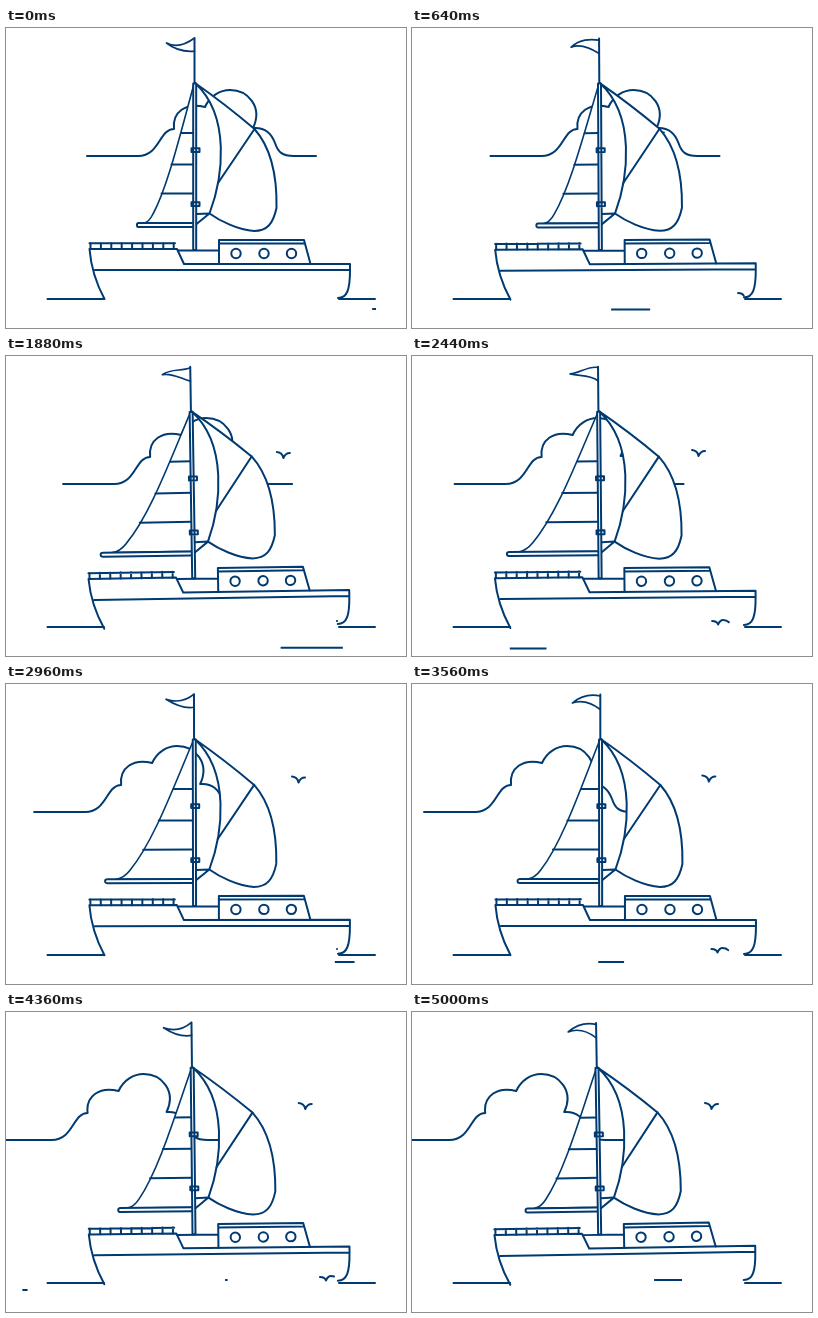
Animation, 400 px wide and 300 px high, one loop 5040 ms. Source, as an HTML page:

```html
<!DOCTYPE html>
<html lang="en">
<head>
<meta charset="utf-8">
<title>Sailing boat</title>
<style>
html, body { margin: 0; width: 100%; height: 100%; overflow: hidden; background: #fff; }
svg { display: block; width: 400px; height: 300px; }
svg * { vector-effect: non-scaling-stroke; }
</style>
</head>
<body>
<svg viewBox="0 0 400 300" fill="none" stroke="#003a70" stroke-width="2" stroke-linejoin="round" stroke-linecap="round">
  <path id="cloud" d="M81 128H132C154 128 153 101 168 101C166 84 180 74 199 79C204 68 214 62 224 62C242 62 257 79 247 100C258 99 265 104 269 115C272 124 276 128 288 128H310"/>
  <path id="gull" d="M-6.5 -3Q-1 -2.500 0 3Q2 -2 6.500 -2"/>
  <path d="M41.500 271H98M333 271H369"/>

  <g id="boat">
    <!-- hull and rail -->
    <path d="M83.500 221H171L178 236H344V242C344 262 341 270 332 270M83.500 221C85 240 91 257 98.500 271M89 242H344"/>
    <path id="rail"/>
    <path d="M172 222.500H213M213 236V212H298L304.500 236M213 215.500H298"/>
    <circle cx="230" cy="225.500" r="4.700"/>
    <circle cx="258" cy="225.500" r="4.700"/>
    <circle cx="285.500" cy="225.500" r="4.700"/>

    <!-- main sail, stretched sideways from the mast -->
    <g id="main" fill="#fff">
      <path stroke-width="1.600" d="M0 56C-13 103 -26 158 -41 186Q-45 194 -50 195H0Z"/>
      <path d="M-13 105H0M-22.500 136.500H0M-32.500 165.500H0"/>
      <rect x="-57" y="195" width="57" height="4" rx="1.500"/>
    </g>

    <!-- headsail -->
    <path fill="#fff" d="M189 55Q219 76 248.500 101C267 122 271 155 270.500 180C267 196 261 203 248 203C232 202 214 193 203.500 185.500C217 150 225 88 189 55Z"/>
    <path d="M248.500 101L212 155M190.500 186L203.500 185.500L190.500 196"/>

    <!-- mast and pennant -->
    <path fill="#fff" d="M187.200 55.500H190.200V222H187.200ZM185.500 120.200H193.500V124H185.500ZM185.500 174.200H193.500V178H185.500Z"/>
    <path d="M188.500 10.500V55"/>
    <path id="flag" stroke-width="1.700"/>
  </g>

  <path id="ripples" stroke-linecap="butt"/>
  <path id="splash" d="M0 265Q5 265 6 268.500Q8 264 11 264Q16 264 18 268"/>
</svg>

<script>
const LOOP = 5040;
const $ = id => document.getElementById(id);
const set = (id, name, value) => $(id).setAttribute(name, value);
const clamp = v => Math.min(1, Math.max(0, v));
const ease = v => (1 - Math.cos(Math.PI * clamp(v))) / 2;
const span = (t, start, length) => ease((t - start) / length);
const wave = turns => Math.cos(2 * Math.PI * turns);

// Ripples run right to left: front start, front time, back start, back time, y, sink
const ripples = [
  [-100, 1550, 150, 1200, 281, 2.5],
  [1285, 1750, 1607, 1410, 291.5, 2],
  [2500, 2120, 2650, 2000, 278, 0]
];
const splashes = [440, 1850, 2960, 3965];

let rail = 'M83.5 215.3H169';
for (let i = 0; i < 9; i++) rail += `M${84.5 + i * 10.4} 215V221`;
set('rail', 'd', rail);

function flagPath(t) {
  const turn = t / 1425;
  const c = wave(turn), near = wave(turn - 0.12), far = wave(turn + 0.08);
  const tip = 17 - 2 * c;
  return `M188.5 ${11 - c}C179 ${13.5 + 5 * near} 170 ${15.5 + 5 * far} 160.5 ${tip}` +
    `C170 ${19 + 4 * far} 179 ${21 + 4 * near} 188.5 ${24.3 - 1.2 * c}`;
}

function ripplePath(t) {
  let d = '';
  for (const [f0, fLen, b0, bLen, base, sink] of ripples) {
    const front = span(t, f0, fLen), back = span(t, b0, bLen);
    if (front <= back) continue;
    const y = base + sink * front * front;
    d += `M${370 - 367 * front} ${y}H${370 - 367 * back}`;
  }
  const u = (t - 4340) / 660;
  if (u > 0) d += `M${219 + 23 * u * u} 268H${220 + 50 * u}`;
  return d;
}

function drawSplash(t) {
  const start = splashes.find(s => t > s && t < s + 900);
  set('splash', 'visibility', start ? 'visible' : 'hidden');
  if (!start) return;
  const u = (t - start) / 900;
  const head = 331 - 42 * ease(u), tail = 331 - 42 * ease(u - 0.25);
  set('splash', 'transform', `translate(${head})`);
  set('splash', 'stroke-dasharray', `${(tail - head) * 1.3} 99`);
}

function draw(t) {
  set('cloud', 'transform', `translate(${-97 * span(t, 80, 5450)})`);

  const left = Math.max(0, 4.9 - t / 1000) ** 2.6 * 1.25;
  set('gull', 'transform', `translate(${299.5 - left} ${94 + 0.23 * left})`);

  set('boat', 'transform', `rotate(${-0.465 * (1 - wave(t / 3333))} 210 285)`);
  const boom = 57 + 36 * span(t, 100, 2000) - 20 * span(t, 2100, 2800);
  set('main', 'transform', `translate(188) scale(${boom / 57} 1)`);

  set('flag', 'd', flagPath(t));
  set('ripples', 'd', ripplePath(t));
  drawSplash(t);
}

function tick() {
  draw(performance.now() % LOOP);
  requestAnimationFrame(tick);
}
tick();
</script>
</body>
</html>
```
